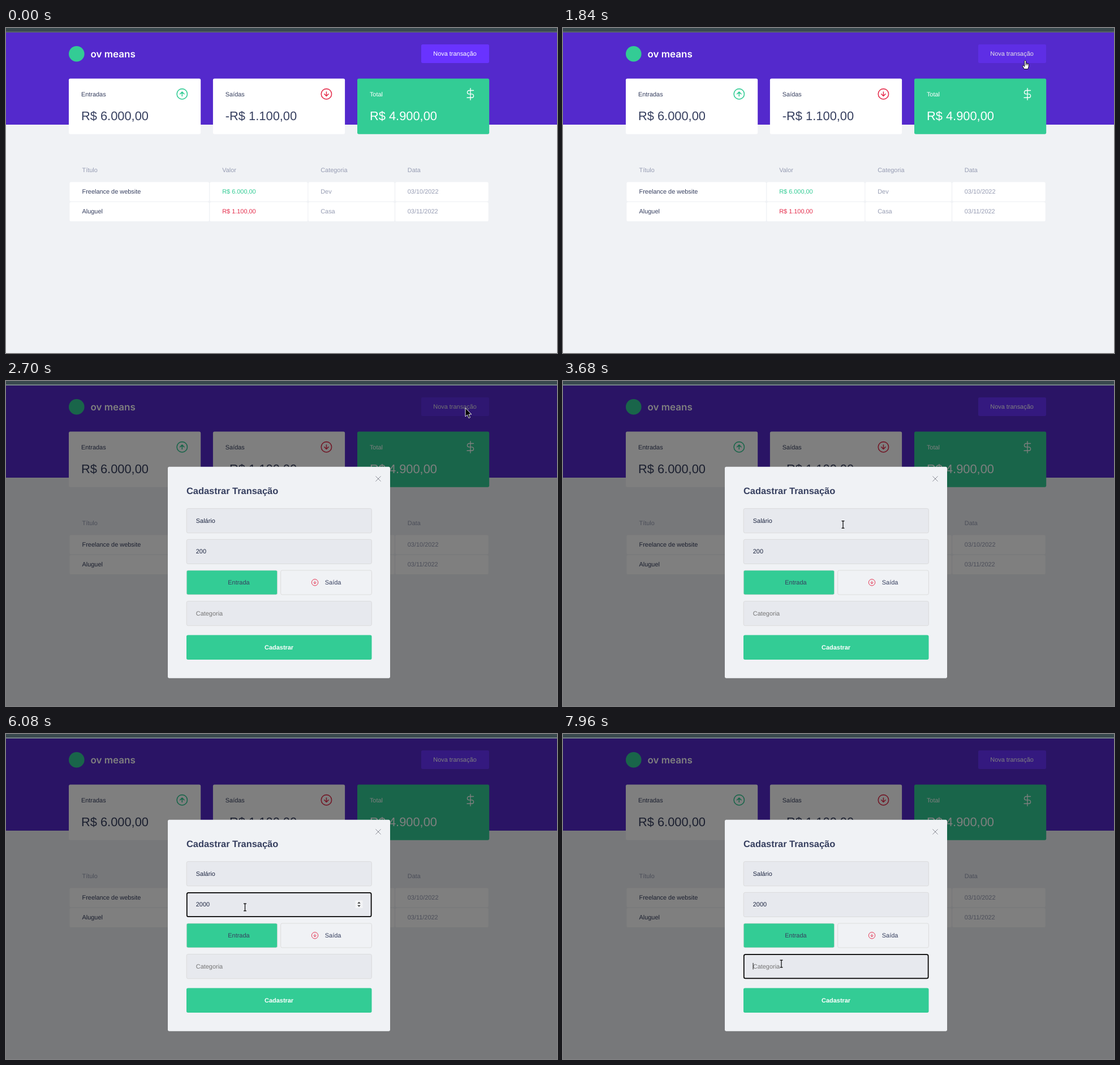
Animation, 974 px wide and 575 px high, one loop 8 s. Source, as an HTML page:

```html
<!DOCTYPE html>
<html lang="pt-BR">
<head>
<meta charset="utf-8">
<title>Transações</title>
<style>
  html, body { margin: 0; width: 100%; height: 100%; overflow: hidden; background: #f0f2f5; }
  svg { display: block; width: 100%; height: 100%; }
  text { font: 10.93px "Liberation Sans", Arial, sans-serif; white-space: pre; text-rendering: geometricPrecision; }
  .amount { font-size: 21.86px; }
  .title { font-size: 16.4px; font-weight: 700; }
  .bold { font-weight: 700; }
  .brand { font: 600 17px Inter, "Open Sans", sans-serif; }
</style>
</head>
<body>
<svg id="stage" viewBox="0 0 974 575" xmlns="http://www.w3.org/2000/svg"></svg>
<script>
const LOOP = 8000;
const NAVY = '#363f5f', MUTED = '#969cb3', GREEN = '#33cc95', RED = '#e52e4d';
const BORDER = '#d7d7d7', FIELD = '#e7e9ee', PAGE = '#f0f2f5';
const stage = document.getElementById('stage');

function add(parent, tag, attrs = {}, content) {
  const el = document.createElementNS('http://www.w3.org/2000/svg', tag);
  for (const key in attrs) el.setAttribute(key, attrs[key]);
  if (content !== undefined) el.textContent = content;
  return parent.appendChild(el);
}
const group = (parent, attrs) => add(parent, 'g', attrs);
const box = (parent, x, y, width, height, fill, attrs = {}) =>
  add(parent, 'rect', { x, y, width, height, fill, rx: 2.7, ...attrs });
const label = (parent, x, y, text, fill, cls = '') =>
  add(parent, 'text', { x, y, fill, class: cls }, text);
const line = (parent, d, stroke, width, attrs = {}) =>
  add(parent, 'path', { d, stroke, 'stroke-width': width, fill: 'none',
    'stroke-linecap': 'round', 'stroke-linejoin': 'round', ...attrs });
const show = (el, on) => el.setAttribute('visibility', on ? 'visible' : 'hidden');
const bordered = { stroke: BORDER, 'stroke-width': 0.8 };

function arrowIcon(parent, x, y, r, color, up) {
  const g = group(parent, { transform: `translate(${x} ${y}) scale(${r / 10} ${(up ? -r : r) / 10})` });
  add(g, 'circle', { r: 10, fill: 'none', stroke: color, 'stroke-width': 1.7 });
  line(g, 'M0 -4V4M-4 0L0 4L4 0', color, 1.7);
}

// Page
const page = group(stage);
box(page, 0, 0, 974, 575, PAGE, { rx: 0 });
box(page, 0, 8, 974, 163, '#5429cc', { rx: 0 });
add(page, 'circle', { cx: 124.8, cy: 45.7, r: 13.8, fill: GREEN });
label(page, 149.5, 51.5, 'ov means', '#fff', 'brand');

box(page, 734, 29, 120, 33, '#6933ff');
label(page, 755.3, 49, 'Nova transação', '#fff');
const buttonShade = box(page, 734, 29, 120, 33, '#000', { opacity: 0.1 });

const cards = [
  [111, 'Entradas', 'R$ 6.000,00', '#fff', NAVY],
  [365.9, 'Saídas', '-R$ 1.100,00', '#fff', NAVY],
  [621, 'Total', 'R$ 4.900,00', GREEN, '#fff'],
];
for (const [x, name, amount, fill, color] of cards) {
  box(page, x, 89.5, 233.2, 98.3, fill);
  label(page, x + 21.9, 120.5, name, color);
  label(page, x + 21.9, 162.8, amount, color, 'amount');
}
arrowIcon(page, 311.3, 116.8, 9.2, GREEN, true);
arrowIcon(page, 566.4, 116.8, 9.2, RED, false);
line(page, 'M821 106.7V127.3M826.5 110.5H818.6a3.1 3.1 0 0 0 0 6.3H823.4a3.2 3.2 0 0 1 0 6.4H815',
  '#fff', 1.35);

const columns = [[112.5, 246.5], [360.4, 172.8], [534.5, 152.2], [688.3, 164.4]];
const textX = [134.5, 382.2, 556.2, 709.8];
['Título', 'Valor', 'Categoria', 'Data'].forEach((name, i) => label(page, textX[i], 255.3, name, MUTED));
const rows = [
  ['Freelance de website', 'R$ 6.000,00', 'Dev', '03/10/2022', GREEN],
  ['Aluguel', 'R$ 1.100,00', 'Casa', '03/11/2022', RED],
];
rows.forEach((row, r) => {
  const top = 272.5 + r * 35.4;
  columns.forEach(([x, width], i) => {
    box(page, x, top, width, 34.2, '#fff');
    label(page, textX[i], top + 20.5, row[i], [NAVY, row[4], MUTED, MUTED][i]);
  });
});

// Modal
const modal = group(stage);
box(modal, 0, 7, 974, 568, '#000', { rx: 0, opacity: 0.5 });
box(modal, 286, 151.8, 393, 374, PAGE);
line(modal, 'M653.7 168.7L662.3 177.3M662.3 168.7L653.7 177.3', '#8a8c95', 1);
label(modal, 319, 199.7, 'Cadastrar Transação', NAVY, 'title');
for (const y of [225.6, 280.3, 389.6]) box(modal, 319.2, y, 327.2, 43.2, FIELD, bordered);
label(modal, 335.8, 250.6, 'Salário', '#1c2540');
const value = label(modal, 335.8, 305.2, '200', '#1c2540');
label(modal, 335.8, 414.5, 'Categoria', '#757575');

const incomeButton = box(modal, 319.2, 335, 160.4, 43, GREEN, bordered);
label(modal, 392.3, 360, 'Entrada', NAVY);
box(modal, 485.6, 335, 160.8, 43, PAGE, bordered);
arrowIcon(modal, 546, 356.4, 5.7, RED, false);
label(modal, 563.8, 360, 'Saída', NAVY);
box(modal, 319, 449.5, 327.5, 43.4, GREEN);
label(modal, 457.1, 474.5, 'Cadastrar', '#fff', 'bold');

const spinner = group(modal);
box(spinner, 617.5, 294.5, 13, 13.5, '#f3f4f6', { rx: 0 });
add(spinner, 'path', { d: 'M621.2 300L624 296.8L626.8 300ZM621.2 302.8L624 306L626.8 302.8Z', fill: '#444' });
const focusRing = box(modal, 319.8, 0, 325.8, 42.2, 'none', { stroke: '#000', 'stroke-width': 1.7 });
const caret = box(modal, 0, 0, 0.9, 11.5, '#000', { rx: 0 });

// Browser edge
box(stage, 0, 0, 974, 7, '#39494e', { rx: 0 });
const edge = box(stage, 0, 6, 974, 2, '#566268', { rx: 0 });

// Pointer
const clickDot = add(stage, 'circle', { r: 8, fill: '#e0b83c', opacity: 0.75 });
const pointer = group(stage);
const shapes = {
  arrow: line(pointer, 'M0 0V15L3.5 11.8L6 17.6L8.5 16.5L6 10.9H10.4Z', '#fff', 0.9, { fill: '#000' }),
  hand: line(pointer,
    'M-1.3 1.2Q0 -.8 1.3 1.2V5.2L2.8 5.4L4.4 5.9L6.2 6.7V11.2L4.8 15.6H-1.8L-4.6 10.6Q-4.7 8.6 -3 9.3L-1.3 11ZM1.3 5.2V8.5M3.7 5.8V8.6',
    '#000', 0.9, { fill: '#fff' }),
  beam: line(pointer, 'M-2 -6.3H2M0 -6.3V6.3M-2 6.3H2', '#000', 1.2),
};

// start, end, then quadratic curve: from, control, to
const moves = [
  [190, 680, [957, 557], [825, 130], [874, 40]],
  [1010, 1490, [874, 40], [856, 5], [836, 38]],
  [1630, 1840, [836, 38], [825, 48], [817, 57]],
  [1840, 2370, [817, 57], [813, 82], [812, 48]],
  [2770, 3330, [812, 48], [690, 200], [541, 265]],
  [3410, 3680, [541, 265], [453, 258], [495, 254]],
  [4010, 4500, [495, 254], [480, 300], [422.5, 306.5]],
  [6080, 6620, [422.5, 306.5], [400, 350], [386, 406.5]],
];

function pointerAt(t) {
  const [start, end, a, b, c] = moves.filter(m => t >= m[0]).pop() || moves[0];
  const p = Math.min(1, Math.max(0, (t - start) / (end - start)));
  const u = p * p * (3 - 2 * p), v = 1 - u;
  return a.map((_, i) => v * v * a[i] + 2 * u * v * b[i] + u * u * c[i]);
}

const within = (t, ...spans) => spans.some(([from, to]) => t >= from && t < to);
const inside = (x, y, l, t, r, b) => x >= l && x <= r && y >= t && y <= b;

function render(t) {
  const [x, y] = pointerAt(t);
  const open = t >= 2700;
  const onButton = t >= 190 && t < 2770 && inside(x, y, 734, 29, 854, 62);
  const onField = open && [225, 280, 389].some(top => inside(x, y, 319, top, 647, top + 44));
  const onIncome = open && inside(x, y, 319, 335, 480, 378);
  const focused = t >= 4690, onCategory = t >= 7890;
  const typed = t >= 5550;

  show(modal, open);
  edge.setAttribute('fill', open ? '#748287' : '#566268');
  buttonShade.setAttribute('opacity', onButton ? 0.1 : 0);
  incomeButton.setAttribute('stroke', onIncome ? '#aaa' : BORDER);

  value.textContent = typed ? '2000' : '200';
  spinner.setAttribute('opacity', +((focused && !onCategory) || (open && inside(x, y, 319, 280, 647, 324))));
  focusRing.setAttribute('opacity', +focused);
  focusRing.setAttribute('y', onCategory ? 390.2 : 280.9);
  caret.setAttribute('opacity', +within(t, [4690, 5220], [5550, 6080], [6620, 7170], [7700, LOOP]));
  caret.setAttribute('x', onCategory ? 335.6 : typed ? 360 : 353.9);
  caret.setAttribute('y', onCategory ? 405 : 295.7);

  show(clickDot, within(t, [2580, 2700], [4690, 4760], [7890, 7960]));
  clickDot.setAttribute('cx', x);
  clickDot.setAttribute('cy', y);

  const kind = onField ? 'beam' : onIncome || (onButton && t < 2440) ? 'hand' : 'arrow';
  for (const name in shapes) show(shapes[name], t >= 190 && name === kind);
  pointer.setAttribute('transform', `translate(${x} ${y})`);
}

const began = performance.now();
function tick() {
  render((performance.now() - began) % LOOP);
  requestAnimationFrame(tick);
}
tick();
</script>
</body>
</html>
```
